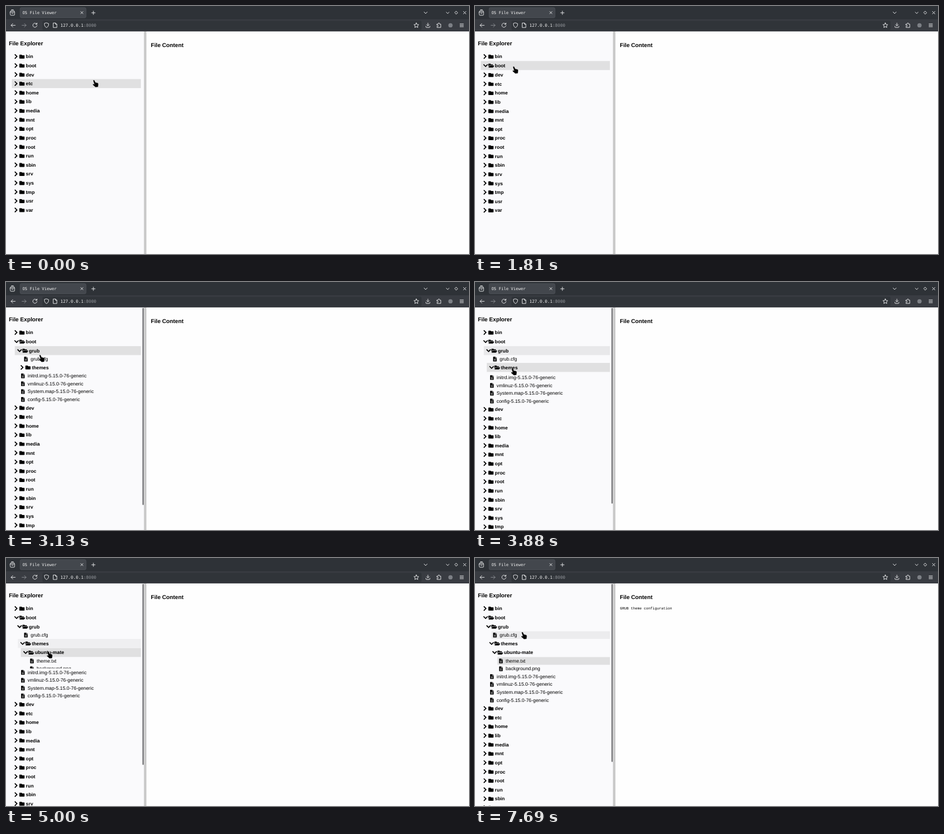
Animation of 800x429 px, one loop 8 s. Source, as an HTML page:

```html
<!DOCTYPE html>
<html lang="en">
<head>
<meta charset="utf-8">
<title>OS File Viewer</title>
<style>
  html, body { margin: 0; width: 100%; height: 100%; overflow: hidden; background: #fefefe; }
  #stage { display: block; width: 100vw; height: 100vh; }
  text { font-family: "Liberation Sans", Arial, sans-serif; font-size: 8.33px; fill: #000; white-space: pre; text-rendering: geometricPrecision; }
  .bold { font-weight: bold; }
  .head { font-weight: bold; font-size: 9.75px; }
  .mono { font-family: "DejaVu Sans Mono", monospace; fill: #f0f0f0; }
  .pre { font-family: "Liberation Mono", monospace; font-size: 6.25px; }
  .ui { fill: none; stroke: #dfe0e2; stroke-width: 1; stroke-linecap: round; stroke-linejoin: round; }
  .dim { stroke: #85888d; }
  .chev { fill: none; stroke: #000; stroke-width: 1.7; }
</style>
</head>
<body>
<svg id="stage" viewBox="0 0 800 429" preserveAspectRatio="none">
  <rect width="800" height="429" fill="#fefefe"/>
  <rect y="44" width="238.5" height="385" fill="#fafafc"/>
  <rect x="238.4" y="44" width="4.2" height="385" fill="#c8c8c8"/>
  <text class="head" x="5" y="67.6">File Explorer</text>
  <text class="head" x="250.3" y="70.5">File Content</text>
  <text class="pre" id="content" x="250.4" y="89">GRUB theme configuration</text>
  <g id="tree"></g>
  <rect id="bar" x="235.7" y="44.8" width="2.3" rx="1.1" fill="#77777a"/>

  <g id="browser">
    <rect width="800" height="24" fill="#2e3237"/>
    <rect y="23" width="800" height="21" fill="#393c42"/>
    <rect x="24.3" y="2.8" width="114" height="17.6" rx="2.5" fill="#43474d" stroke="#565a60" stroke-width=".6"/>
    <rect x="63" y="25.4" width="655" height="16.6" rx="2.5" fill="#303439"/>
    <text class="mono" x="28.4" y="14.3" style="font-size:7px">OS File Viewer</text>
    <text class="mono" x="94" y="36.2" style="font-size:7.36px">127.0.0.1<tspan fill="#92959a">:8000</tspan></text>
    <path class="ui" d="M7.4 10.4h7.4v4.6q0 1-1 1h-5.4q-1 0-1-1zM7.4 10.2l1-2h5.4l1 2M9.4 6.6h3.4M9.8 12.7h2.6"/>
    <path class="ui" d="M129.2 9.6l3.8 3.8m0-3.8l-3.8 3.8M148 11.8h6m-3-3v6M722.4 10.4l2.7 2.7 2.7-2.7"/>
    <path class="ui" d="M760.8 10.7l2.4 2.4 2.4-2.4M778 9.2l2.5 2.5-2.5 2.5-2.5-2.5zM790.4 9.4l4.4 4.4m0-4.4l-4.4 4.4"/>
    <path class="ui" d="M16 33.4H8.8m3-3l-3 3 3 3"/>
    <path class="ui dim" d="M27.6 33.4h7.2m-3-3l3 3-3 3"/>
    <path class="ui" d="M53 31.2a3.6 3.6 0 1 0 .6 2.6M53.5 29.4v2.2h-2.2"/>
    <path class="ui" d="M70 29.2l3.7 1.3q.2 5-3.7 6.9-3.9-1.9-3.7-6.9z"/>
    <path class="ui" d="M82 29.4h3.7l2.2 2.2v5.6H82zM85.6 29.5v2.2h2.2"/>
    <path class="ui" d="M709 29.2l1.25 2.7 2.95.35-2.2 2 .6 2.95-2.6-1.5-2.6 1.5.6-2.95-2.2-2 2.95-.35z"/>
    <path class="ui" d="M729 29.5v4.8m-2.3-2.3l2.3 2.3 2.3-2.3M725.6 35v1.2q0 .9.9.9h5q.9 0 .9-.9V35"/>
    <path class="ui" d="M744.8 31.3h2v-.7q0-1.2 1.2-1.2t1.2 1.2v.7h2v5.8h-6.4v-1.8h.8q1.1 0 1.1-1.1t-1.1-1.1h-.8z"/>
    <circle cx="768" cy="33.4" r="3.7" fill="#7d8086"/>
    <path class="ui" d="M784.4 31h6m-6 2.4h6m-6 2.4h6"/>
  </g>

  <path id="hand" fill="#000" stroke="#fff" stroke-width=".5" stroke-opacity=".7"
    d="M-1.5 1.1Q-.4-.6.9.6L2.5 4.1 6.4 5.1Q8 5.7 7.7 7.8L7.1 12.1 2.7 12.5-1.7 8.7Q-2.7 7.2-1.3 6.8L.5 7.3Z"/>
</svg>
<script>
const LOOP = 8000, ROW = 15.62, FILE = 13.54, TOP = 79.55, SLIDE = 200;
const NS = "http://www.w3.org/2000/svg";
const byId = id => document.getElementById(id);

const dir = (name, openAt = Infinity, kids = []) => ({ name, openAt, kids });
const file = name => ({ name });

const boot = dir("boot", 1800, [
  dir("grub", 2700, [
    file("grub.cfg"),
    dir("themes", 3825, [
      dir("ubuntu-mate", 4870, [file("theme.txt"), file("background.png")])
    ])
  ]),
  ...["initrd.img", "vmlinuz", "System.map", "config"].map(n => file(n + "-5.15.0-76-generic"))
]);
const roots = "bin boot dev etc home lib media mnt opt proc root run sbin srv sys tmp usr var"
  .split(" ").map(n => n === "boot" ? boot : dir(n));

// Row shading: [ms, opacity]
const shade = {
  etc: [[0, .104], [110, .104], [400, 0]],
  dev: [[300, 0], [540, .104], [900, .104], [1150, 0]],
  bin: [[970, 0], [1120, .06], [1280, 0]],
  boot: [[1130, 0], [1380, .104], [2700, .104], [2950, 0]],
  grub: [[2020, 0], [2310, .092], [2690, .092], [2760, .104], [3825, .104], [4000, 0]],
  "grub.cfg": [[3170, 0], [3260, .03], [3400, 0], [7440, 0], [7690, .056]],
  themes: [[3290, 0], [3500, .104], [4870, .104], [5100, 0], [7360, 0], [7460, .04], [7620, 0]],
  "ubuntu-mate": [[4270, 0], [4500, .075], [4880, .075], [4960, .104], [5800, .104], [6000, .022],
    [6310, .022], [6370, 0], [7240, 0], [7340, .04], [7500, 0]],
  "theme.txt": [[5130, 0], [5310, .056], [6310, .056], [6400, .104]]
};

// Fingertip path: [ms, x, y]
const path = [
  [60, 152, 128], [560, 66, 122], [810, 66, 122], [1080, 58, 85], [1380, 67, 104.5],
  [1810, 67, 104.5], [2310, 48, 116], [2690, 48, 116], [3130, 59, 126], [3380, 64.5, 149],
  [4190, 64.5, 149], [4500, 72.5, 158.5], [4880, 72.5, 158.5], [5310, 73, 174],
  [6310, 73, 174], [6560, 81, 182], [7130, 81, 182], [7690, 82, 128]
];

const linear = u => u;
const swing = u => .5 - Math.cos(Math.PI * u) / 2;

function sample(keys, t, col, ease) {
  const i = keys.findIndex(k => k[0] > t);
  if (i === 0) return keys[0][col];
  if (i < 0) return keys[keys.length - 1][col];
  const a = keys[i - 1], b = keys[i];
  return a[col] + (b[col] - a[col]) * ease((t - a[0]) / (b[0] - a[0]));
}

function add(parent, tag, attrs = {}, text) {
  const el = document.createElementNS(NS, tag);
  for (const k in attrs) el.setAttribute(k, attrs[k]);
  if (text) el.textContent = text;
  return parent.appendChild(el);
}

function build(node, parent, depth) {
  const x = 10 + depth * 5.2, g = node.el = add(parent, "g");
  const isDir = !!node.kids, h = isDir ? ROW : FILE, mid = h / 2;
  const left = isDir ? x : x + 7.9;
  node.fill = add(g, "rect", { x: left, width: 233 - left, height: h, "fill-opacity": 0 });
  if (!isDir) {
    const icon = add(g, "g", { transform: `translate(${x + 10.9} ${mid - 4})` });
    add(icon, "path", { d: "M.7 0H3.6V2.4H6.2V7.5Q6.2 8.2 5.5 8.2H.7Q0 8.2 0 7.5V.7Q0 0 .7 0ZM4.2 0L6.2 1.9H4.2Z" });
    add(icon, "path", { d: "M1.5 4.1H4.7M1.5 5.4H4.7M1.5 6.7H4.7", stroke: "#fff", "stroke-width": .55 });
    add(g, "text", { x: x + 22.1, y: mid + 2.9 }, node.name);
    return;
  }
  const at = { transform: `translate(${x} ${mid})` };
  node.shut = add(g, "g", at);
  add(node.shut, "path", { class: "chev", d: "M5.2-3.7L8.9 0 5.2 3.7" });
  add(node.shut, "path", { d: "M13.9-3.2H16.9L18 -2.1H21.2Q22 -2.1 22-1.3V2.8Q22 3.6 21.2 3.6H13.9Q13.1 3.6 13.1 2.8V-2.4Q13.1-3.2 13.9-3.2Z" });
  node.wide = add(g, "g", at);
  add(node.wide, "path", { class: "chev", d: "M4.7-2L8.3 1.6 11.9-2" });
  add(node.wide, "path", { d: "M13.9-3.2H16.6L17.7-2.1H20.3Q21.1-2.1 21.1-1.3V-.6H15.6Q14.8-.6 14.4.1L13.1 2.3V-2.4Q13.1-3.2 13.9-3.2ZM15.7 0H22.6Q23.3 0 22.9.7L21.5 3.1Q21.2 3.6 20.6 3.6H13.8Q13.1 3.6 13.5 2.9L14.9.5Q15.2 0 15.7 0Z" });
  add(g, "text", { x: x + 24.3, y: mid + 3, class: "bold" }, node.name);
  if (node.kids.length) {
    node.box = add(g, "svg", { y: ROW, width: 240, height: 0 });
    node.kids.forEach(k => build(k, node.box, depth + 1));
  }
}

// Places a node and returns its height
function place(node, y, t) {
  node.el.setAttribute("transform", `translate(0 ${y.toFixed(2)})`);
  if (shade[node.name]) node.fill.setAttribute("fill-opacity", sample(shade[node.name], t, 1, linear));
  if (!node.kids) return FILE;
  const open = t >= node.openAt;
  node.shut.style.display = open ? "none" : "";
  node.wide.style.display = open ? "" : "none";
  if (!node.box) return ROW;
  const full = stack(node.kids, 0, t);
  const h = open ? full * swing(Math.min(1, (t - node.openAt) / SLIDE)) : 0;
  node.box.setAttribute("height", h);
  node.box.style.display = h ? "" : "none";
  return ROW + h;
}

function stack(nodes, y, t) {
  return nodes.reduce((sum, n) => sum + place(n, y + sum, t), 0);
}

function draw(t) {
  const extra = stack(roots, TOP, t) - roots.length * ROW;
  const bar = byId("bar");
  bar.style.display = extra > 54 ? "" : "none";
  bar.setAttribute("height", 135700 / (299 + extra));
  byId("content").style.display = t >= 5810 ? "" : "none";
  const x = sample(path, t, 1, swing), y = sample(path, t, 2, swing);
  byId("hand").setAttribute("transform", `translate(${x.toFixed(2)} ${y.toFixed(2)})`);
}

roots.forEach(n => build(n, byId("tree"), 0));
const start = performance.now();
function tick() {
  draw((performance.now() - start) % LOOP);
  requestAnimationFrame(tick);
}
tick();
</script>
</body>
</html>
```
